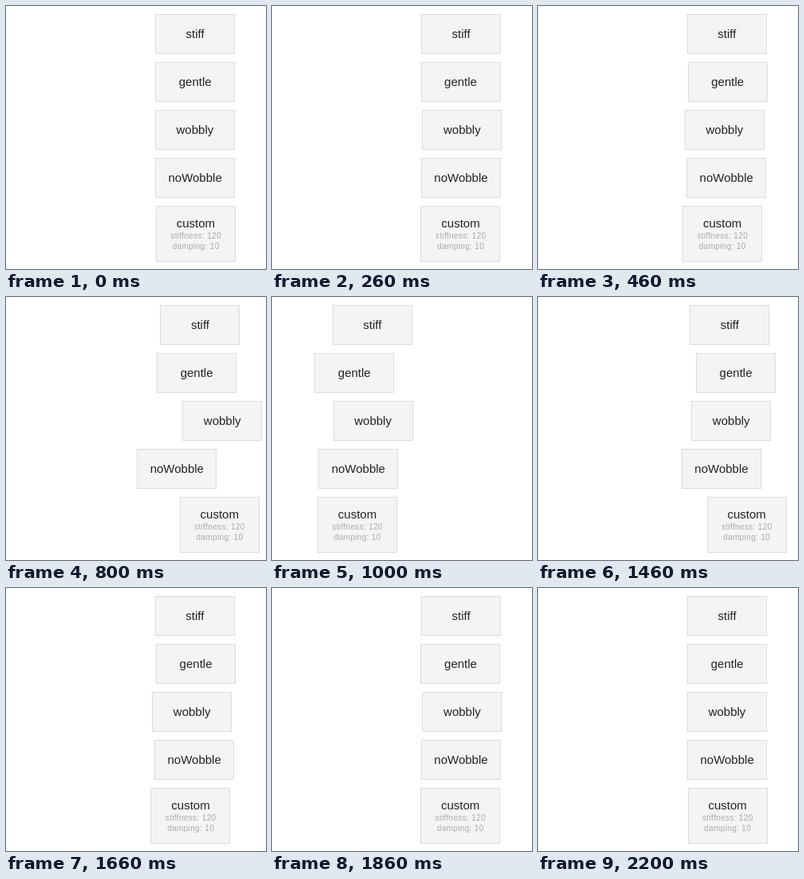
These frames come from a looping animation (326x329 px, 2230 ms). An HTML page with a canvas:

```html
<!DOCTYPE html>
<html lang="en">
<head>
<meta charset="utf-8">
<title>Spring presets</title>
<style>
  html, body { margin: 0; width: 100%; height: 100%; overflow: hidden; background: #fff; }
  canvas { display: block; }
</style>
</head>
<body>
<canvas id="stage" width="326" height="329"></canvas>
<script>
const ctx = document.getElementById('stage').getContext('2d');
const LOOP = 2230;      // ms
const TURN = 1.073;     // s, the moment the motion runs backwards to
const FROM = 8;
const STEP = 1 / 120;
const FONT = '"Liberation Sans", Arial, sans-serif';

const springs = [
  { name: 'stiff', k: 210, c: 20, to: 187.1, y: 10, h: 50 },
  { name: 'gentle', k: 120, c: 14, to: 187.1, y: 70, h: 50 },
  { name: 'wobbly', k: 180, c: 12, to: 187.1, y: 130, h: 50 },
  { name: 'noWobble', k: 170, c: 26, to: 187.1, y: 190, h: 50 },
  { name: 'custom', k: 120, c: 10, to: 187.4, y: 250, h: 70,
    notes: ['stiffness: 120', 'damping: 10'] }
];

// Position of a damped spring, s seconds after release.
function springAt({ k, c, to }, s) {
  let x = FROM, v = 0;
  for (; s > 0; s -= STEP) {
    v += (k * (to - x) - c * v) * STEP;
    x += v * Math.min(s, STEP);
  }
  return x;
}

function label(text, x, y, size, color, spacing) {
  ctx.font = size + 'px ' + FONT;
  ctx.letterSpacing = spacing + 'px';
  ctx.fillStyle = color;
  ctx.fillText(text, x + spacing / 2, y);
}

function drawBox(spring, s) {
  const { name, y, h, notes = [] } = spring;
  const x = springAt(spring, s);
  const left = Math.round(x);
  ctx.fillStyle = '#f4f4f4';
  ctx.fillRect(left, y, 100, h);
  ctx.strokeStyle = '#dcdcdc';
  ctx.strokeRect(left + 0.5, y + 0.5, 99, h - 1);

  const mid = x + 50;
  label(name, mid, y + (notes.length ? 27 : 30), 15, '#222', 0);
  notes.forEach((note, i) => label(note, mid, y + 41 + i * 13, 10, '#aaa', 0.35));
}

// Thirty pictures a second, started on whole hundredths; the first is held.
function pictureTime(ms) {
  const tick = Math.floor(ms / 10);
  const n = Math.ceil(3 * (tick + 1) / 10) - 1;
  return n < 2 ? 0 : n / 30;
}

function draw(ms) {
  const s = Math.abs(pictureTime(ms) - TURN);
  ctx.fillStyle = '#fff';
  ctx.fillRect(0, 0, 326, 329);
  springs.forEach(spring => drawBox(spring, s));
}

ctx.textAlign = 'center';
ctx.lineWidth = 1;
const start = performance.now();
function loop() {
  draw((performance.now() - start) % LOOP);
  requestAnimationFrame(loop);
}
loop();
</script>
</body>
</html>
```
